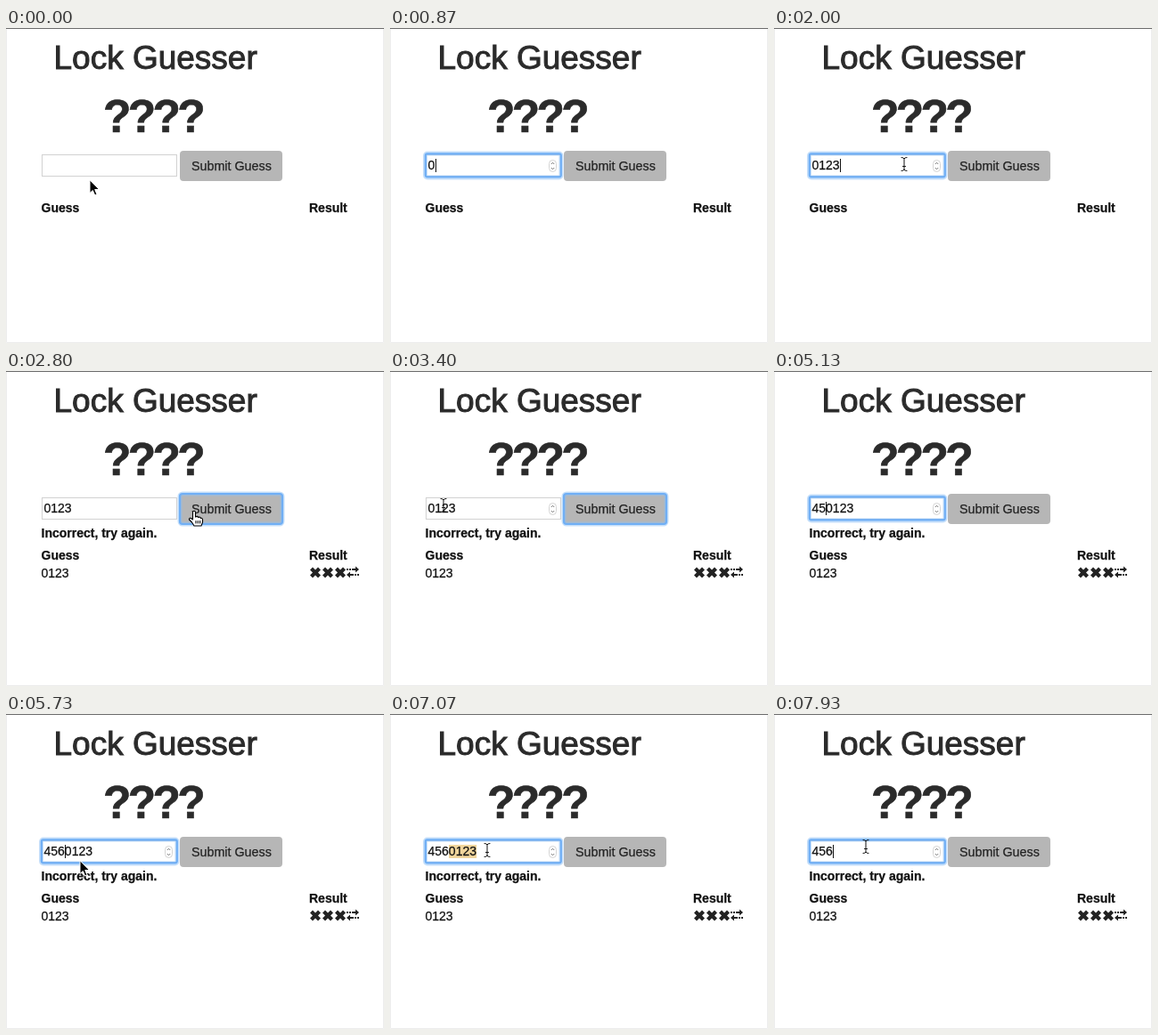
Animation, 424 px wide and 354 px high, one loop 8 s. Source, as an HTML page:

```html
<!DOCTYPE html>
<html lang="en">
<head>
<meta charset="utf-8">
<title>Lock Guesser</title>
<style>
  html, body { margin: 0; width: 100%; height: 100%; overflow: hidden; background: #fff; }
  svg { display: block; }
  text { font: 14px "Liberation Sans", Arial, sans-serif; fill: #111; stroke: #111; stroke-width: .25px; }
  .bold { font-weight: bold; }
  .title { font-size: 37px; fill: #2b2b2b; stroke: #2b2b2b; stroke-width: 1px; }
  .secret { font-size: 51.5px; font-weight: bold; letter-spacing: -3.7px; fill: #2b2b2b; stroke: #2b2b2b; stroke-width: .6px; }
  .label { font-size: 14.3px; fill: #222; stroke: #222; }
  .ring { fill: none; stroke: #70aff5; stroke-width: 2.2; }
  .glow { fill: none; stroke: #8cbff6; stroke-width: 5; opacity: .5; }
  .cursor { stroke-linejoin: round; stroke-linecap: round; }
</style>
</head>
<body>
<svg width="424" height="354" viewBox="0 0 424 354">
  <defs>
    <path id="cross" d="M3 0 6 3 9 0 12 3 9 6 12 9 9 12 6 9 3 12 0 9 3 6 0 3z" fill="#222"/>
    <path id="arrowRight" d="M0 3h2v2h-2zM3 3h2v2h-2zM6 3h4V.5L14 4 10 7.500V5H6z" fill="#222"/>
  </defs>
  <path d="M.5 0V353.500H423.500V0" fill="none" stroke="#ececec"/>
  <path d="M0 .5H424" stroke="#6b6b6b"/>

  <text class="title" x="53.500" y="46">Lock Guesser</text>
  <text class="secret" x="109" y="116.500">????</text>

  <rect x="40.500" y="142.500" width="151" height="24" fill="#fff" stroke="#d2d2d2"/>
  <g id="inputRing">
    <rect class="glow" x="39.500" y="141" width="152.500" height="27" rx="2.500"/>
    <rect class="ring" x="39.800" y="141.300" width="152" height="26" rx="2"/>
  </g>
  <g id="spinner">
    <rect x="178.500" y="148.500" width="8" height="13" rx="4" fill="#fff" stroke="#d4d4d4"/>
    <path d="M180.800 153 182.500 151.200 184.200 153M180.800 157 182.500 158.800 184.200 157" fill="none" stroke="#777"/>
  </g>
  <rect id="selection" x="66" y="147" height="15" fill="#f0d59c"/>
  <text id="value" x="42.500" y="159"></text>
  <rect id="caret" y="147" width="1" height="15" fill="#111"/>

  <rect x="195" y="138" width="115" height="34" rx="4" fill="#b6b6b6"/>
  <g id="buttonRing">
    <rect class="glow" x="195" y="138" width="115" height="34" rx="3"/>
    <rect class="ring" x="195" y="138" width="115" height="34" rx="3"/>
  </g>
  <text class="label" x="208" y="160">Submit Guess</text>

  <g id="headings">
    <text class="bold" x="39.500" y="207">Guess</text>
    <text class="bold" x="340" y="207">Result</text>
  </g>
  <g id="outcome">
    <text class="bold" x="39.500" y="187">Incorrect, try again.</text>
    <text x="39.500" y="232">0123</text>
    <use href="#cross" x="341" y="220.500"/>
    <use href="#cross" x="355" y="220.500"/>
    <use href="#cross" x="369" y="220.500"/>
    <use href="#arrowRight" x="382" y="219"/>
    <use href="#arrowRight" transform="translate(396 233) rotate(180)"/>
  </g>

  <g id="cursor" class="cursor">
    <path id="arrow" d="M0 0V14.500L3.300 11.500 5.700 17 8 16 5.700 10.500H10.300z" fill="#000" stroke="#fff"/>
    <path id="beam" d="M-3-8.500Q-.5-8.500 0-7Q.5-8.500 3-8.500M0-7V5M-3 6.500Q-.5 6.500 0 5Q.5 6.500 3 6.500M-1.500 1.500H1.500" fill="none" stroke="#111"/>
    <path id="hand" d="M-1.500 9V1Q-1.500-.8 0-.8T1.500 1V6Q4 4.500 4.500 6.500Q7 5.500 7.300 7.500Q9.500 7 9.500 9V12L8 16H0L-2.500 12-5.500 9Q-5.500 6.500-3.500 7.500zM2 10.500V13M4.300 10.500V13M6.600 10.500V13" fill="#fff" stroke="#000" stroke-width="1.100"/>
  </g>
</svg>
<script>
const el = id => document.getElementById(id);
const show = (id, on) => el(id).style.display = on ? "" : "none";
const LOOP = 8000, TICKS_PER_MS = 15 / 1000;
const TEXT_X = 42.5, DIGIT = 7.785;
const SUBMIT = 36, REFOCUS = 59, DRAG = 101, ERASE = 114;

// [tick, text before caret, text after caret]
const edits = [
  [4, "", ""], [12, "0", ""], [17, "01", ""], [24, "012", ""], [28, "0123", ""],
  [REFOCUS, "", "0123"], [72, "4", "0123"], [77, "45", "0123"], [80, "456", "0123"],
  [95, "456", "0123"], [ERASE, "456", ""]
];

// Pointer moves: [start tick, end tick, from x, from y, to x, to y]
const moves = [
  [0, 4, 94, 171, 95, 160], [28, 36, 95, 150, 211, 158], [42, 54, 211, 158, 50, 152],
  [54, 60, 50, 152, 42, 151], [82, 86, 42, 151, 83, 165], [87, 95, 83, 165, 66, 153],
  [100, 106, 66, 153, 109, 154], [118, 119, 109, 154, 103, 150]
];

// The pointer hides while typing
const hidden = [[13, 28], [73, 83], [ERASE, 119]];

const lastStarted = (list, tick) => list.filter(item => item[0] <= tick).pop();

function pointerAt(tick) {
  const [start, end, x0, y0, x1, y1] = lastStarted(moves, tick);
  const rest = 1 - Math.min(1, (tick - start) / (end - start));
  const k = 1 - rest * rest;
  return [x0 + (x1 - x0) * k, y0 + (y1 - y0) * k];
}

function draw(ms) {
  const tick = Math.floor(ms * TICKS_PER_MS + .06);
  const [x, y] = pointerAt(tick);
  const inInput = x > 39 && x < 192 && y > 141 && y < 164;
  const onButton = x >= 195 && x < 310 && y > 138 && y < 172;
  const submitted = tick >= SUBMIT;
  const buttonFocus = submitted && tick < REFOCUS;
  const inputFocus = tick >= 4 && !buttonFocus;
  const visible = !hidden.some(([from, to]) => tick >= from && tick < to);

  const [editTick, before, after] = lastStarted(edits, tick) || [0, "", ""];
  const selecting = tick >= DRAG && tick < ERASE;
  const selected = selecting ? Math.max(0, Math.min(4, Math.round((x - 66) / DIGIT))) : 0;
  const blinkOn = Math.floor((tick - editTick) / 8) % 2 === 0;

  el("value").textContent = before + after;
  el("selection").setAttribute("width", selected * DIGIT);
  el("caret").setAttribute("x", Math.round(TEXT_X + before.length * DIGIT + .3));
  show("caret", inputFocus && blinkOn && !selected);
  show("inputRing", inputFocus);
  show("buttonRing", buttonFocus);
  show("spinner", inputFocus || (visible && inInput));
  show("outcome", submitted);
  el("headings").setAttribute("transform", `translate(0 ${submitted ? 5 : 0})`);

  show("cursor", visible);
  el("cursor").setAttribute("transform", `translate(${Math.round(x)} ${Math.round(y)})`);
  show("beam", inInput);
  show("hand", onButton);
  show("arrow", !inInput && !onButton);
}

function frame() {
  draw(performance.now() % LOOP);
  requestAnimationFrame(frame);
}
frame();
</script>
</body>
</html>
```
